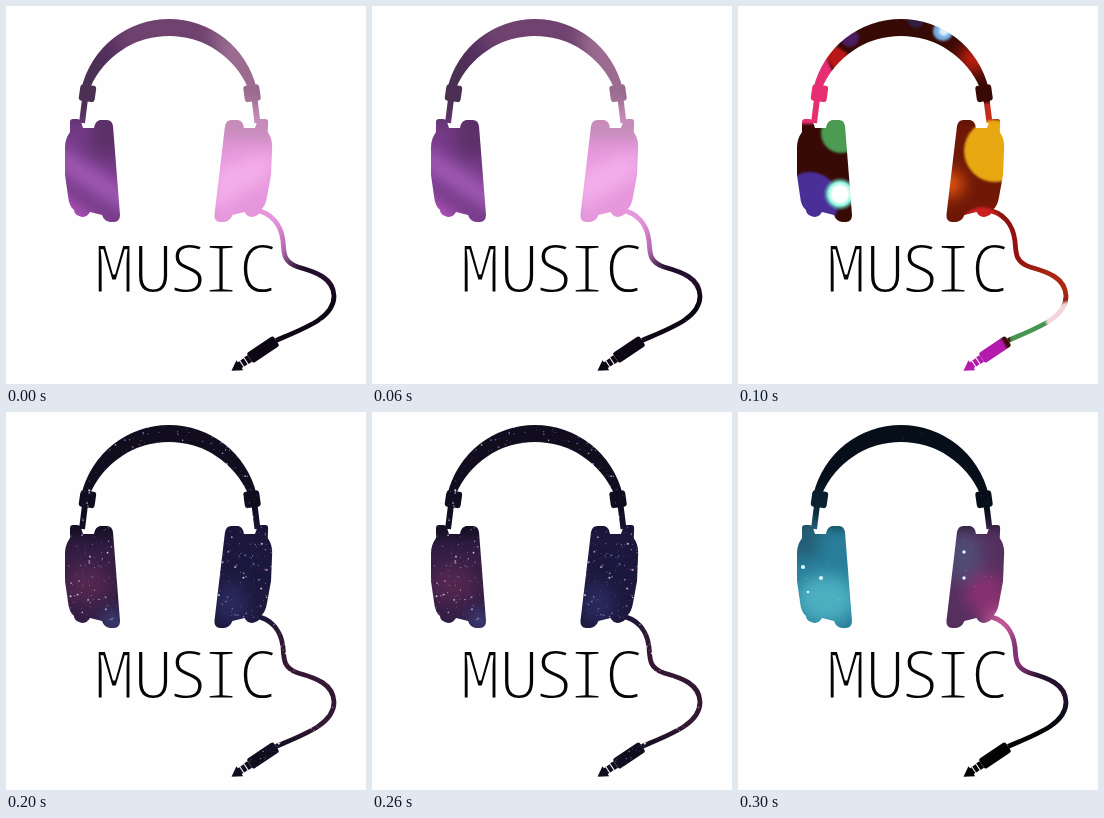
These frames come from a looping animation (360x378 px, 400 ms). An HTML page:

```html
<!DOCTYPE html>
<html lang="en">
<head>
<meta charset="utf-8">
<title>Music</title>
<style>
  html, body { margin: 0; width: 100%; height: 100%; overflow: hidden; background: #fefefe; }
  svg { display: block; width: 360px; height: 378px; }
  .skin { visibility: hidden; animation: show 400ms step-end infinite; }
  .nebula { animation-delay: -400ms; }
  .bokeh { animation-delay: -300ms; }
  .stars { animation-delay: -200ms; }
  .aurora { animation-delay: -100ms; }
  @keyframes show {
    0% { visibility: visible; }
    25%, 100% { visibility: hidden; }
  }
  /* The background-coloured outline thins the letters. */
  text {
    font: 400 67px "Noto Sans Mono", "DejaVu Sans Mono", monospace;
    fill: #050505; stroke: #fefefe; stroke-width: 2.8px;
  }
</style>
</head>
<body>
<svg viewBox="0 0 360 378">
  <defs>
    <filter id="soft" filterUnits="userSpaceOnUse" x="-40" y="-40" width="440" height="460" color-interpolation-filters="sRGB">
      <feGaussianBlur stdDeviation="8"/>
    </filter>
    <filter id="edge" filterUnits="userSpaceOnUse" x="-40" y="-40" width="440" height="460" color-interpolation-filters="sRGB">
      <feGaussianBlur stdDeviation="1.2"/>
    </filter>
    <radialGradient id="flare">
      <stop offset=".45" stop-color="#fff"/>
      <stop offset=".7" stop-color="#8cf5dc"/>
      <stop offset="1" stop-color="#40a0a0" stop-opacity="0"/>
    </radialGradient>
    <g id="hinge">
      <rect x="73.500" y="79" width="16" height="16.500" rx="3" transform="rotate(8 81.500 87)"/>
      <path d="M79 93 76 117" stroke="#fff" stroke-width="6"/>
    </g>
    <path id="cup" d="M67 113H71Q74 113 75 116L77 122H88Q89 115 94 114H101Q106 114 107 120L114 209Q114 215.500 108 216H104Q98 215 96 209L84 206Q80 213 73 210 68 208 68 204 63 200 62 190L59 169V141Q59 133 64 126V116Q64 113 67 113Z"/>
    <mask id="headphones" maskUnits="userSpaceOnUse" x="0" y="0" width="360" height="378">
      <g fill="#fff">
        <path d="M75.500 82A90 90 0 0 1 250.500 82L242 82A86 86 0 0 0 84 82Z"/>
        <use href="#hinge"/>
        <use href="#hinge" transform="matrix(-1 0 0 1 327.500 0)"/>
        <use href="#cup"/>
        <use href="#cup" transform="matrix(-1 0 -.04 1 330.800 0)"/>
        <path d="M248 204C266 206 275 219 277 235 278 247 277 256 292 261 310 266 327.500 272 328 290 328 312 299 322 270 334.500" fill="none" stroke="#fff" stroke-width="4.800"/>
        <g transform="translate(257 343.500) rotate(-34)">
          <rect x="-16" y="-6" width="32" height="12" rx="2.500"/>
          <path d="M-20-4H-16V4H-20ZM-25-3.500H-21V3.500H-25ZM-38 0-28-6V-3.500H-26V3.500H-28V6Z"/>
        </g>
      </g>
    </mask>
  </defs>

  <rect width="360" height="378" fill="#fefefe"/>

  <g mask="url(#headphones)">
    <g class="skin nebula">
      <rect width="360" height="378" fill="#553060"/>
      <g filter="url(#soft)">
        <path d="M40 50H100V118H40Z" fill="#4b3053"/>
        <path d="M110 0H215V45H110Z" fill="#70426f"/>
        <path d="M205 20 265 35V118H222Z" fill="#9b6c90"/>
        <path d="M45 112H130V230H45Z" fill="#743a86"/>
        <path d="M45 135 125 185V210L45 160Z" fill="#a259b6"/>
        <path d="M45 180 105 225H45Z" fill="#b553c0"/>
        <path d="M85 105H125V150H85Z" fill="#5c3069"/>
        <path d="M195 108H285V240H195Z" fill="#e697dc"/>
        <path d="M200 100H275V135H200Z" fill="#c78cba"/>
        <path d="M205 165 265 145V170L205 205Z" fill="#f3aeea"/>
        <path d="M262 225H284V255H262Z" fill="#d77bce"/>
        <path d="M289 248H355V378H205V305H289Z" fill="#0d0614"/>
        <path d="M300 258H345V282H300Z" fill="#2a1034"/>
      </g>
    </g>

    <g class="skin bokeh">
      <rect width="360" height="378" fill="#380a05"/>
      <g filter="url(#soft)">
        <path d="M195 110H275V225H195Z" fill="#701806"/>
        <circle cx="212" cy="178" r="13" fill="#ef5a12"/>
        <circle cx="235" cy="53" r="14" fill="#d02212"/>
        <path d="M248 205H300V275H248Z" fill="#961010"/>
        <path d="M290 255H345V300H290Z" fill="#ad2810"/>
      </g>
      <g filter="url(#edge)">
        <path d="M60 56 87 50 97 70 88 118H60Z" fill="#e62f72"/>
        <path d="M85 48 95 38 110 48 98 65Z" fill="#b81818"/>
        <circle cx="112" cy="32" r="9" fill="#4b1d60"/>
        <circle cx="178" cy="13" r="9" fill="#302040"/>
        <circle cx="205" cy="25" r="10" fill="#78aee0"/>
        <circle cx="206" cy="25" r="5" fill="#d8f0ff"/>
        <path d="M246 97H258V116H246Z" fill="#c52a1c"/>
        <circle cx="103" cy="127" r="20" fill="#4b9b52"/>
        <circle cx="72" cy="195" r="29" fill="#4a2f99"/>
        <circle cx="257" cy="145" r="31" fill="#e7a812"/>
        <ellipse cx="244" cy="216" rx="19" ry="15" fill="#c92020"/>
        <path d="M306 304 330 295 328 319H306Z" fill="#f1d7d9"/>
        <path d="M270 318 308 305V328L273 341Z" fill="#459451"/>
        <path d="M215 350 258 323 270 344 230 378H215Z" fill="#b41bad"/>
      </g>
      <circle cx="102" cy="188" r="17" fill="url(#flare)"/>
    </g>

    <g class="skin stars">
      <rect width="360" height="378" fill="#110d1f"/>
      <g filter="url(#soft)">
        <path d="M45 125H125V225H45Z" fill="#341d44"/>
        <ellipse cx="80" cy="172" rx="24" ry="20" fill="#52264f"/>
        <ellipse cx="107" cy="210" rx="10" ry="12" fill="#3c4684"/>
        <path d="M200 110H278V220H200Z" fill="#1c173c"/>
        <ellipse cx="225" cy="192" rx="18" ry="22" fill="#29285c"/>
        <path d="M265 205H340V325H265Z" fill="#341833"/>
      </g>
    </g>

    <g class="skin aurora">
      <rect width="360" height="378" fill="#050e19"/>
      <g filter="url(#soft)">
        <path d="M55 75H100V115H55Z" fill="#0a2233"/>
        <path d="M40 112H130V230H40Z" fill="#287e99"/>
        <ellipse cx="88" cy="187" rx="30" ry="24" fill="#4cafc0"/>
        <path d="M45 105H80V145H45Z" fill="#245c74"/>
        <path d="M195 112H285V228H195Z" fill="#55305f"/>
        <ellipse cx="225" cy="145" rx="20" ry="25" fill="#514b75"/>
        <ellipse cx="248" cy="182" rx="21" ry="22" fill="#87306f"/>
        <ellipse cx="264" cy="215" rx="18" ry="18" fill="#c95a9c"/>
        <path d="M267 230H297V265H267Z" fill="#8e347c"/>
        <path d="M300 260H340V295H300Z" fill="#28112f"/>
        <path d="M210 312H340V378H210Z" fill="#030305"/>
      </g>
      <g fill="#d9fbff">
        <circle cx="65" cy="155" r="2"/>
        <circle cx="83" cy="166" r="2"/>
        <circle cx="70" cy="180" r="1.300"/>
        <circle cx="226" cy="140" r="1.700"/>
        <circle cx="226" cy="166" r="1.700"/>
      </g>
    </g>
  </g>

  <text x="88 127 161.500 195 232" y="287">MUSIC</text>
</svg>
<script>
  function scatter(selector, count, colors, maxRadius, seed) {
    const group = document.querySelector(selector);
    const random = () => (seed = (seed * 16807) % 2147483647) / 2147483647;
    for (let i = 0; i < count; i++) {
      const star = document.createElementNS("http://www.w3.org/2000/svg", "circle");
      star.setAttribute("cx", 55 + random() * 280);
      star.setAttribute("cy", 10 + random() * 360);
      star.setAttribute("r", 0.35 + random() ** 3 * maxRadius);
      star.setAttribute("fill", colors[i % colors.length]);
      star.setAttribute("opacity", 0.4 + random() * 0.5);
      group.append(star);
    }
  }
  scatter(".stars", 2600, ["#fff", "#a9b5f0", "#c78fb9", "#7088cf"], 0.8, 71);
  scatter(".aurora", 300, ["#9ed3df", "#b98ab8"], 0.3, 29);
  scatter(".nebula", 60, ["#eac4ed"], 0.5, 13);
</script>
</body>
</html>
```
